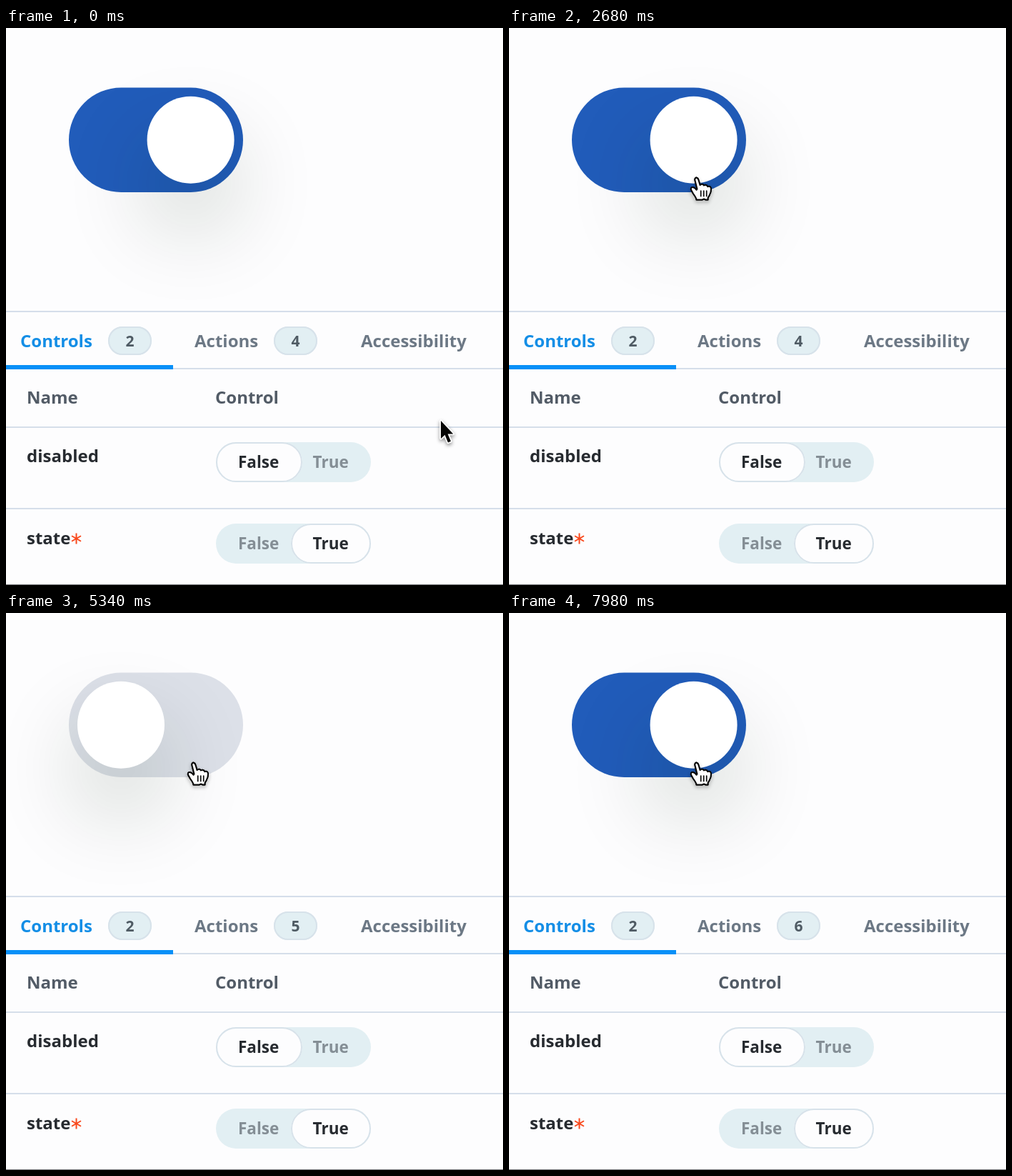
These frames come from a looping animation (696 by 780 pixels, 8000 ms). An HTML page with a canvas:

```html
<!DOCTYPE html>
<html lang="en">
<head>
<meta charset="utf-8">
<title>Toggle controls</title>
<style>
  html, body { margin: 0; width: 100%; height: 100%; overflow: hidden; background: #fdfdfe; }
  canvas { display: block; width: 696px; height: 780px; }
</style>
</head>
<body>
<canvas id="stage" width="696" height="780"></canvas>
<script>
const ctx = document.getElementById('stage').getContext('2d');
const LOOP = 8000;
const CLICKS = [3470, 6762];
const SLIDE = 200;
const MOVE = { start: 20, length: 1372 };
const PATH = [[609, 549], [499, 295], [262.5, 209.5]];
const BG = '#fdfdfe', INK = '#272b30', MUTED = '#848e95', TAB = '#6c7885', HEAD = '#525b66';
const RULE = '#d5deea', EDGE = '#d7e2ea', FILL = '#e2eff3';
const OFF = [220, 224, 232], ON = [33, 92, 186];
const TRACK = { x: 88, y: 83.5, w: 244, h: 146.5 };

const lerp = (a, b, t) => a + (b - a) * t;
const fraction = (t, start, length) => Math.min(1, Math.max(0, (t - start) / length));
// Quick start, soft landing.
const slide = (t, start) => {
  const u = Math.sqrt(fraction(t, start, SLIDE));
  return u * u * (3 - 2 * u);
};
// Minimum-jerk curve of a hand-moved pointer.
const reach = u => u ** 3 * (10 - 15 * u + 6 * u * u);

function rect(x, y, w, h, color) {
  ctx.fillStyle = color;
  ctx.fillRect(x, y, w, h);
}

function pill(x, y, w, h, fill, stroke) {
  ctx.beginPath();
  ctx.roundRect(x, y, w, h, h / 2);
  ctx.fillStyle = fill;
  ctx.fill();
  if (!stroke) return;
  ctx.beginPath();
  ctx.roundRect(x + 1, y + 1, w - 2, h - 2, h / 2 - 1);
  ctx.strokeStyle = stroke;
  ctx.lineWidth = 2;
  ctx.stroke();
}

function text(str, x, y, size, color, align = 'left') {
  ctx.font = `700 ${size}px "Open Sans", "Noto Sans", sans-serif`;
  ctx.textAlign = align;
  ctx.fillStyle = color;
  ctx.fillText(str, x, y);
}

function drawToggle(on) {
  const color = OFF.map((v, i) => Math.round(lerp(v, ON[i], on)));
  pill(TRACK.x, TRACK.y, TRACK.w, TRACK.h, `rgb(${color})`);
  ctx.save();
  ctx.shadowColor = 'rgba(0,35,11,.2)';
  ctx.shadowOffsetY = 61;
  ctx.shadowBlur = 122;
  pill(lerp(100, 197.6, on), 95.7, 122, 122, '#fff');
  ctx.restore();
}

function badge(x, label) {
  pill(x, 418, 61, 40, FILL, EDGE);
  text(label, x + 30.5, 445.5, 21, '#4f5b64', 'center');
}

function booleanControl(y, value) {
  pill(294, y, 217, 56, FILL);
  if (value) pill(399, y, 112, 56, BG, EDGE);
  else pill(294, y, 121, 56, BG, EDGE);
  text('False', 325, y + 36, 22.5, value ? MUTED : INK);
  text('True', 429.5, y + 36, 22.5, value ? INK : MUTED);
}

function asterisk(x, y, r) {
  ctx.beginPath();
  for (let i = 0; i < 3; i++) {
    const a = Math.PI * (.5 + i / 3);
    const dx = r * Math.cos(a), dy = r * Math.sin(a);
    ctx.moveTo(x - dx, y - dy);
    ctx.lineTo(x + dx, y + dy);
  }
  ctx.strokeStyle = '#f9481c';
  ctx.lineWidth = 2;
  ctx.stroke();
}

function drawPanel(actions) {
  [396, 476, 558, 672].forEach(y => rect(0, y, 696, 2, RULE));
  rect(0, 472, 234, 6, '#0890f8');
  rect(0, 779, 696, 1, '#77787c');
  text('Controls', 20, 447, 24, '#148ee6');
  badge(143, '2');
  text('Actions', 264, 447, 24, TAB);
  badge(375, String(actions));
  text('Accessibility', 497, 447, 24, TAB);
  text('Name', 29, 526, 24, HEAD);
  text('Control', 293, 526, 24, HEAD);
  text('disabled', 29, 608, 24, INK);
  text('state', 29, 723, 24, INK);
  asterisk(98.5, 715, 7.5);
  booleanControl(580, false);
  booleanControl(694, true);
}

const arrow = new Path2D('M0 0V25L5.6 19.8L10 30.5L14 28.8L9.6 18.4H17.3Z');
const hand = new Path2D(
  'M-2 4C-3 1 -.5 -.5 1 .5C2.3 1.2 3 3 3.3 4.5L5 10.5C7 8.5 9.5 9 10.3 11' +
  'C12.5 9.7 15 10.5 15.7 12.7C18.5 11.5 20.5 13 20.5 16C20.5 20 19.5 22.5 18 25' +
  'L16 28.5V31H13L10.5 29.8L8 31H0C0 28.5 -2 26 -4.5 22.5L-7 18' +
  'C-8.5 15.5 -7.5 13.2 -5 13.5C-3 13.8 -1.5 15 0 17.3L1 16Z');
const fingers = new Path2D('M6.2 18.5V26M10.2 18.5V26M14.2 18.5V26');

function drawCursor(x, y, pointing) {
  const shape = pointing ? hand : arrow;
  ctx.save();
  ctx.translate(x, y + (pointing ? 0 : 1));
  ctx.lineJoin = ctx.lineCap = 'round';
  ctx.save();
  ctx.shadowColor = 'rgba(0,0,0,.45)';
  ctx.shadowBlur = 5;
  ctx.shadowOffsetY = 2.5;
  ctx.strokeStyle = pointing ? '#080808' : '#fff';
  ctx.lineWidth = pointing ? 2 : 3.5;
  ctx.stroke(shape);
  ctx.restore();
  ctx.fillStyle = pointing ? '#fff' : '#050505';
  ctx.fill(shape);
  if (pointing) {
    ctx.strokeStyle = '#080808';
    ctx.lineWidth = 2;
    ctx.stroke(hand);
    ctx.lineWidth = 1.7;
    ctx.stroke(fingers);
  }
  ctx.restore();
}

function cursorAt(t) {
  const s = reach(fraction(t, MOVE.start, MOVE.length));
  return [0, 1].map(i =>
    lerp(lerp(PATH[0][i], PATH[1][i], s), lerp(PATH[1][i], PATH[2][i], s), s));
}

function overTrack(x, y) {
  const r = TRACK.h / 2;
  const cx = Math.min(TRACK.x + TRACK.w - r, Math.max(TRACK.x + r, x));
  return Math.hypot(x - cx, y - TRACK.y - r) < r;
}

function draw(t) {
  rect(0, 0, 696, 780, BG);
  drawToggle(1 - slide(t, CLICKS[0]) + slide(t, CLICKS[1]));
  drawPanel(4 + CLICKS.filter(c => t >= c).length);
  const [x, y] = cursorAt(t);
  drawCursor(x, y, overTrack(x, y));
}

const began = performance.now();
function tick() {
  draw((performance.now() - began) % LOOP);
  requestAnimationFrame(tick);
}
tick();
</script>
</body>
</html>
```
